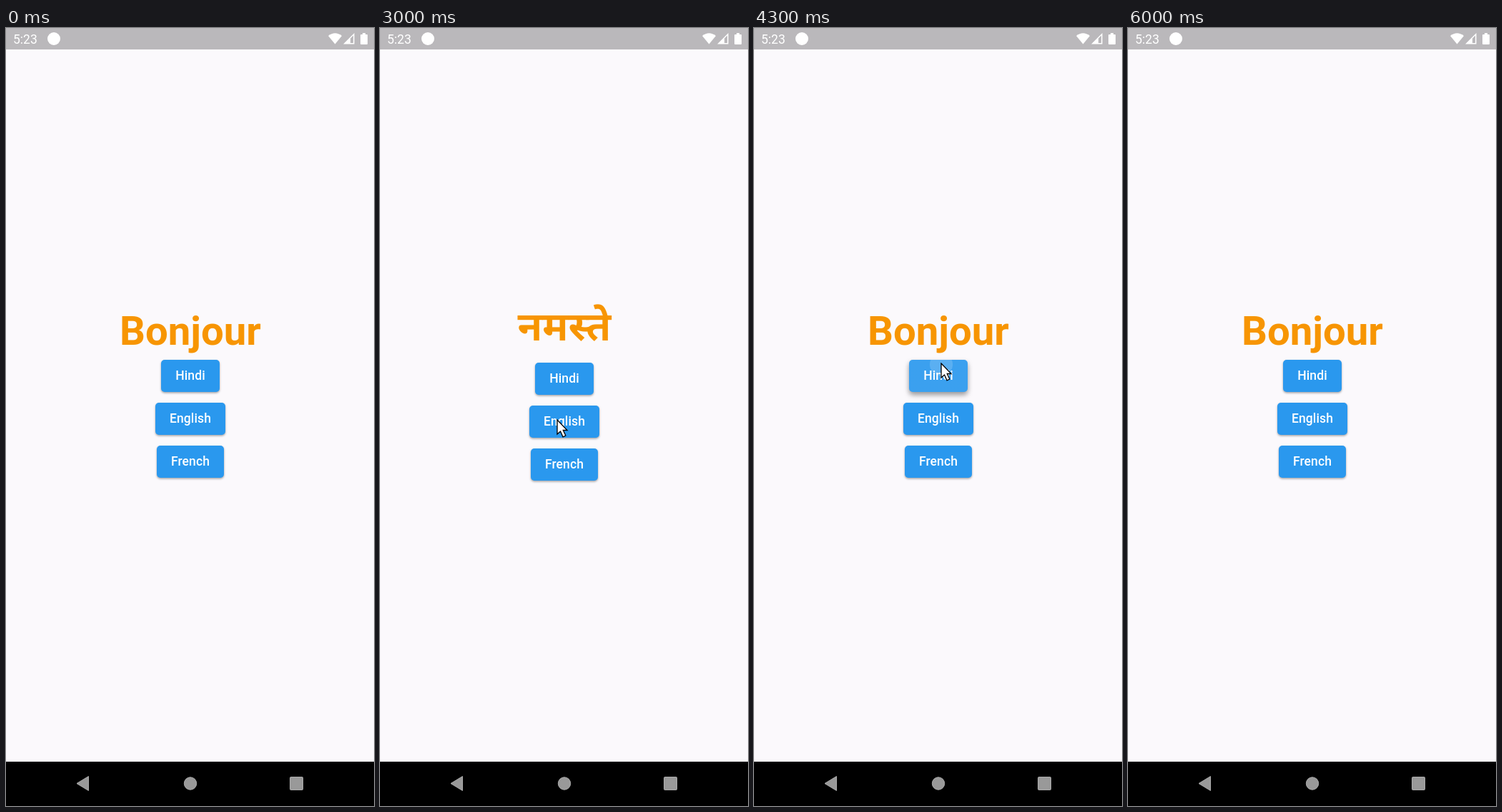
Animation of 515x1088 px, one loop 6.1 s. Source, as an HTML page:

```html
<!DOCTYPE html>
<html lang="en">
<head>
<meta charset="utf-8">
<title>Greetings</title>
<style>
  html, body { margin: 0; width: 100%; height: 100%; overflow: hidden; background: #fbf9fc; }
  svg { position: absolute; left: 0; top: 0; }
  text { font-family: Roboto, "Noto Sans", sans-serif; }
  #greeting { font: 700 56.3px Roboto, "Noto Sans Devanagari", "Noto Sans", sans-serif; text-anchor: middle; fill: #f79502; }
  #drawn { fill: none; stroke: #f79502; stroke-width: 6.5; }
  .button {
    position: absolute; height: 45px; border-radius: 5px; background-color: #2a98ee; color: #fff;
    font: 500 17.5px/45px Roboto, sans-serif; letter-spacing: .12px; text-align: center;
  }
</style>
</head>
<body>
<svg width="515" height="1088" viewBox="0 0 515 1088">
  <path fill="#bab8bb" d="M0 0H515V30H0z"/>
  <g fill="#fff">
    <text x="10" y="21.5" font-size="17.5">5:23</text>
    <circle cx="67" cy="15" r="9"/>
    <path d="M460.500 22.500L451 11Q460.500 3.500 470 11z"/>
    <path fill-rule="evenodd" d="M472 22.500L487.500 7V22.500zM482 14.500V21H486V10.500z"/>
    <path d="M499 7h4v2h2q1 0 1 1v12q0 1-1 1h-8q-1 0-1-1v-12q0-1 1-1h2z"/>
  </g>
  <path d="M0 1026H515V1088H0z"/>
  <g fill="#999" stroke="#aaa">
    <path d="M99 1056.500L115.500 1046.500V1066.500z"/>
    <circle cx="258" cy="1056.500" r="8.700"/>
    <rect x="397.500" y="1047.500" width="18" height="18" rx="1"/>
  </g>
  <text id="greeting" x="258"></text>
  <path id="drawn" d="M192 403H324M199 421H218M218 403V438M234 403V426q-1 7-6 3M232 424H254M254 403V438
    M269 403q9 13-2 15l14 18M271 420H288M316 403V438M315 419h-9q-13 4-3 18M316 403Q316 390 300 389"/>
</svg>
<svg id="cursor" width="20" height="28" viewBox="-1 -1 20 28" style="z-index:1">
  <path d="M0 0V20L4.500 16 8 23.800 11.800 22 8.300 14.500H14z" fill="#fff" stroke="#000" stroke-width="1.300"/>
</svg>
<script>
const LOOP = 6100, STEP = 100;
const HINDI = 0, ENGLISH = 1, FRENCH = 2;
const greetings = ['नमस्ते', 'Hello', 'Bonjour'];
const greeting = document.getElementById('greeting');
const drawn = document.getElementById('drawn');
const cursor = document.getElementById('cursor');

const buttons = [['Hindi', 82], ['English', 98], ['French', 94.5]].map(([label, width], i) => {
  const el = document.createElement('div');
  el.className = 'button';
  el.textContent = label;
  el.style.width = width + 'px';
  document.body.append(el);
  return { el, width, left: 258 - width / 2, top: 463.5 + i * 60.2 };
});

const taps = [
  { down: 2380, up: 2480, button: HINDI, x: 249, y: 490, tint: '0,0,0' },
  { down: 3130, up: 3257, button: ENGLISH, x: 248, y: 549 },
  { down: 3750, up: 3870, button: FRENCH, x: 248, y: 606 },
  { down: 4200, up: 4340, button: HINDI, x: 262, y: 470 },
  { down: 4680, up: 4797, button: ENGLISH, x: 249, y: 549 },
  { down: 5170, up: 5290, button: FRENCH, x: 248, y: 604 }
];

// time, x, y of the pointer tip
const path = [
  [1800, 290, 47], [1900, 270, 250], [2000, 254, 440], [2200, 249, 491], [2700, 249, 491],
  [3000, 248, 548], [3300, 248, 550], [3500, 249, 586], [3700, 248, 606], [3900, 248, 606],
  [4200, 262, 475], [4300, 262, 469], [4450, 262, 471], [4650, 249, 549], [4850, 248, 551],
  [5100, 248, 602], [5200, 248, 604], [5700, 248, 606]
];

const clamp = v => Math.max(0, Math.min(1, v));
const mix = (a, b, p) => a + (b - a) * p;

// Missing glyphs all share one width; then the word is drawn with strokes.
const pen = document.createElement('canvas').getContext('2d');
pen.font = '700 56px Roboto, "Noto Sans Devanagari", "Noto Sans", sans-serif';
const hasDevanagari = pen.measureText('न').width !== pen.measureText('म').width;

function drawButton(button, index, t, shift) {
  const { el, left, top, width } = button;
  const tap = taps.find(k => k.button === index && t >= k.down && t < k.up + 375);
  let lift = 0, overlay = 'none';
  if (tap) {
    const since = t - tap.up;
    const spread = clamp(since / 225) ** 2;
    const fade = clamp((t - tap.down) / 75) * clamp((375 - since) / 150);
    const x = mix(tap.x - left, width / 2, spread);
    const y = mix(tap.y - top, 22.5, spread);
    const radius = mix(16, width * .65 + 6, spread);
    const ripple = `rgba(255,255,255,${.16 * fade})`;
    const tint = `rgba(${tap.tint || '255,255,255'},${.08 * fade})`;
    overlay = `radial-gradient(circle at ${x}px ${y}px, ${ripple} ${radius - .5}px, transparent ${radius + .5}px),
      linear-gradient(${tint}, ${tint})`;
    lift = clamp((t - tap.down) / 100) * clamp((200 - since) / 100);
  }
  el.style.left = left + 'px';
  el.style.top = top + shift + 'px';
  el.style.backgroundImage = overlay;
  el.style.boxShadow = `0 ${mix(1.5, 4, lift)}px ${mix(3, 7, lift)}px rgba(0,0,0,${mix(.35, .4, lift)})`;
}

function drawCursor(t) {
  const next = path.findIndex(p => p[0] > t);
  cursor.style.display = next > 0 ? '' : 'none';
  if (next < 1) return;
  const [t0, x0, y0] = path[next - 1], [t1, x1, y1] = path[next];
  const p = (t - t0) / (t1 - t0);
  cursor.style.transform = `translate(${mix(x0, x1, p) - 1}px, ${mix(y0, y1, p) - 1}px)`;
}

function draw() {
  const t = Math.floor(performance.now() % LOOP / STEP) * STEP;
  const done = taps.filter(k => k.up <= t).pop();
  const language = done ? done.button : FRENCH;
  const hindi = language === HINDI;
  const strokes = hindi && !hasDevanagari;
  greeting.textContent = strokes ? '' : greetings[language];
  greeting.setAttribute('y', hindi ? 437 : 442.5);
  drawn.style.display = strokes ? '' : 'none';
  buttons.forEach((b, i) => drawButton(b, i, t, hindi ? 4 : 0));
  drawCursor(t);
  requestAnimationFrame(draw);
}
draw();
</script>
</body>
</html>
```
